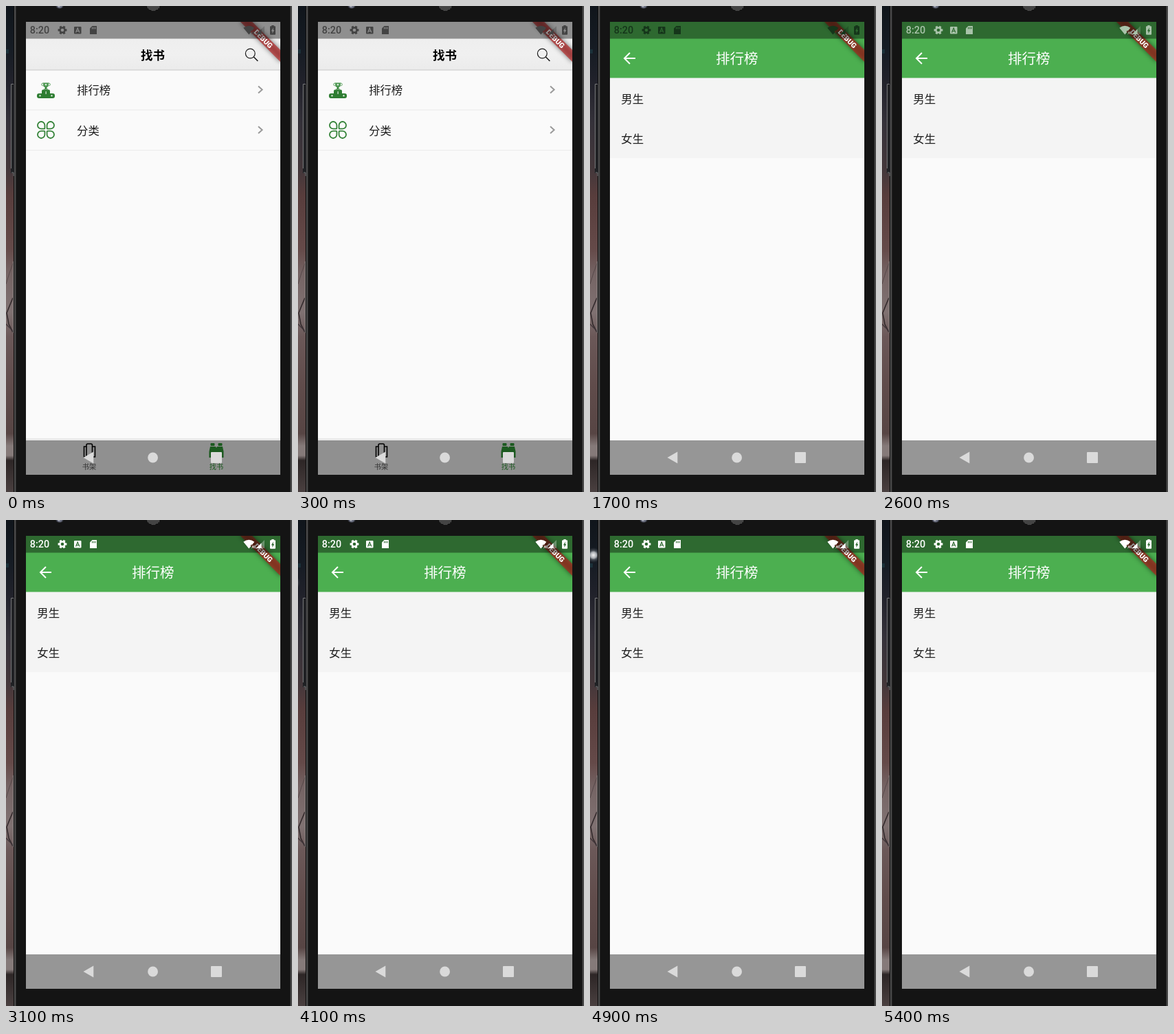
Recreate the animation shown at these times as an HTML page with a canvas. Size 416 by 706 pixels, loop 8 s.

```html
<!DOCTYPE html>
<html lang="zh-CN">
<head>
<meta charset="utf-8">
<style>
html, body { margin: 0; width: 100%; height: 100%; overflow: hidden; background: #141414; }
canvas { display: block; width: 416px; height: 706px; }
</style>
</head>
<body>
<canvas id="stage"></canvas>
<script>
const W = 416, H = 706, LOOP = 8000, TAU = Math.PI * 2;
const SCREEN = { x: 29, y: 23, w: 370, h: 658 };
const CJK = '"Noto Sans CJK SC", "Noto Sans CJK", sans-serif';
const ROBOTO = 'Roboto, sans-serif';
const canvas = document.getElementById('stage');
const dpr = window.devicePixelRatio || 1;
canvas.width = W * dpr;
canvas.height = H * dpr;
const c = canvas.getContext('2d');

function rect(x, y, w, h, fill) {
  c.fillStyle = fill;
  c.fillRect(x, y, w, h);
}
function round(x, y, w, h, r, fill) {
  c.beginPath();
  c.roundRect(x, y, w, h, r);
  c.fillStyle = fill;
  c.fill();
}
function disc(x, y, r, fill) {
  c.beginPath();
  c.arc(x, y, r, 0, TAU);
  c.fillStyle = fill;
  c.fill();
}
function poly(points, fill) {
  c.beginPath();
  points.forEach(([x, y]) => c.lineTo(x, y));
  c.closePath();
  c.fillStyle = fill;
  c.fill();
}
function line(points, color, width) {
  c.beginPath();
  points.forEach(([x, y]) => c.lineTo(x, y));
  c.strokeStyle = color;
  c.lineWidth = width;
  c.stroke();
}
function gradient(y0, y1, stops) {
  const g = c.createLinearGradient(0, y0, 0, y1);
  stops.forEach(([at, color]) => g.addColorStop(at, color));
  return g;
}
// Han text centred vertically on y
function han(text, x, y, size, fill, align = 'left', weight = 400) {
  c.font = `${weight} ${size}px ${CJK}`;
  c.textAlign = align;
  c.fillStyle = fill;
  c.fillText(text, x, y + size * 0.38);
}

function wallpaper(t) {
  rect(0, 0, 16, H, gradient(0, H, [
    [0, '#10151b'], [0.09, '#161c24'], [0.15, '#20212a'], [0.24, '#35323a'],
    [0.34, '#45383b'], [0.39, '#583d3c'], [0.5, '#654a49'], [0.55, '#756464'],
    [0.63, '#807272'], [0.68, '#6b5858'], [0.78, '#604c4b'], [0.88, '#574544'],
    [0.905, '#857a79'], [0.925, '#857a79'], [0.935, '#2d2626'], [1, '#4a4040']
  ]));
  rect(0, 63, 4, 6, 'rgba(30,62,72,.6)');
  line([[10, 424], [5, 436], [1, 446], [4, 462], [10, 474]], '#332a2c', 1.6);
  line([[0, 462], [6, 468], [11, 473]], '#40363a', 1.4);
  line([[0, 404], [5, 388], [10, 374]], '#57494a', 1);
  if (t >= 4100 && t < 5400) {
    const k = Math.floor((t - 4900) / 100);
    const x = 5 + 1.6 * k, y = 51 - 5 * k;
    const g = c.createRadialGradient(x, y, 1, x, y, 11);
    g.addColorStop(0, 'rgba(240,240,240,.95)');
    g.addColorStop(0.35, 'rgba(205,208,212,.8)');
    g.addColorStop(0.6, 'rgba(130,135,142,.4)');
    g.addColorStop(1, 'rgba(90,95,105,0)');
    rect(0, y - 11, 12, 22, g);
  }
}

function phone() {
  rect(11, 0, 405, H, '#141414');
  rect(11, 0, 1, H, '#0d0d0d');
  rect(12, 0, 2, H, '#4b4b4b');
  rect(14, 0, 1, H, '#2a2a2a');
  rect(413, 0, 1, H, '#2a2a2a');
  rect(414, 0, 2, H, '#4b4b4b');
  round(7, 113, 5, 130, 1, '#202124');
  line([[11, 113.5], [7.5, 113.5], [7.5, 236]], '#77787a', 1);
  line([[8, 242], [11, 242], [11, 247]], '#77787a', 1);
  rect(10, 371, 1, 104, '#8a8382');
  disc(78, -2, 6, '#34363f');
  disc(78, -1, 4, '#6d7182');
  disc(77, 0, 1.6, '#b1b3bc');
  disc(214, -3, 10, '#333');
  for (let y = 0; y < 7; y += 2)
    for (let x = -8; x <= 8; x += 2)
      if (x * x + (y + 3) ** 2 < 90) rect(214 + x, y, 1, 1, '#777');
}

function podium() {
  const green = '#2e7d32';
  round(45, 127, 26, 7, 3, green);
  round(52, 121.5, 12, 12, 2, green);
  poly([[53.5, 111.5], [62.5, 111.5], [61.5, 116.5], [59, 119], [57, 119], [54.5, 116.5]], '#4b9650');
  c.strokeStyle = '#66a86a';
  c.lineWidth = 1;
  for (const x of [53.5, 62.5]) {
    c.beginPath();
    c.arc(x, 114, 1.8, 0, TAU);
    c.stroke();
  }
  rect(57, 118, 2, 3, green);
  rect(55, 120.3, 6, 1, green);
  disc(58, 114.3, 1.2, '#e4f1e5');
  rect(57.6, 124, 1, 4, '#fff');
  rect(48.5, 129, 2, 2.5, '#d5e7d6');
  rect(65.5, 129, 2, 2.5, '#d5e7d6');
}

function clover() {
  c.strokeStyle = '#358339';
  c.lineWidth = 1.8;
  for (let i = 0; i < 4; i++) {
    c.save();
    c.translate(58, 180);
    c.rotate(i * TAU / 4);
    c.beginPath();
    c.roundRect(1.6, 1.6, 10.4, 10.4, [1, 5.2, 5.2, 5.2]);
    c.stroke();
    c.restore();
  }
}

function tabIcons() {
  const green = '#2f9535';
  c.strokeStyle = '#000';
  c.lineWidth = 1.6;
  c.beginPath();
  c.roundRect(117, 636, 8.5, 19, 2);
  c.moveTo(117, 640);
  c.lineTo(113.5, 640);
  c.lineTo(113.5, 655);
  c.lineTo(129.5, 655);
  c.lineTo(129.5, 640);
  c.lineTo(125.5, 640);
  c.stroke();
  for (const s of [-1, 1]) {
    c.save();
    c.translate(306, 0);
    c.scale(s, 1);
    round(2.5, 635, 6, 4, 1, green);
    poly([[1, 640], [9, 640], [10.5, 647], [10.5, 656], [2, 656], [2, 650], [0, 650], [0, 642]], green);
    c.restore();
  }
}

function findPage() {
  rect(29, 23, 370, 658, '#fafafa');
  rect(29, 23, 370, 70, gradient(47, 93, [[0, '#eeeeee'], [0.5, '#f0f0f0'], [1, '#ebebeb']]));
  rect(29, 92.5, 370, 1, '#c9c9c9');
  han('找书', 213.5, 71, 17.5, '#000', 'center', 700);
  c.strokeStyle = '#1a1a1a';
  c.lineWidth = 1.2;
  c.beginPath();
  c.arc(355.3, 69, 6.9, 0, TAU);
  c.stroke();
  line([[360.3, 74], [366.3, 80]], '#1a1a1a', 1.6);
  podium();
  clover();
  [['排行榜', 122, 150.5], ['分类', 180.5, 209]].forEach(([text, y, edge]) => {
    han(text, 103, y, 16.4, '#1c1c1c');
    line([[367, y - 5.5], [372.6, y - 0.5], [367, y + 4.5]], '#9a9a9a', 2);
    rect(29, edge, 370, 1, '#ebebeb');
  });
  rect(29, 629, 370, 52, '#efefef');
  rect(29, 628.5, 370, 1, '#dcdcdc');
  tabIcons();
  han('书架', 121, 669.5, 10.2, '#555', 'center');
  han('找书', 306, 669.5, 10.2, '#2f9535', 'center');
}

function rankPage() {
  rect(29, 23, 370, 658, '#fafafa');
  rect(29, 104, 370, 117, '#f4f4f4');
  rect(29, 23, 370, 81.5, '#4caf50');
  line([[66, 76], [50.5, 76]], '#fff', 2);
  line([[58, 68], [50, 76], [58, 84]], '#fff', 2);
  han('排行榜', 213.7, 76.5, 20.5, '#fff', 'center');
  han('男生', 45.3, 135, 16.4, '#1f1f1f');
  han('女生', 45.3, 192.5, 16.4, '#1f1f1f');
}

function ribbon() {
  c.save();
  c.translate(399, 23);
  c.rotate(Math.PI / 4);
  c.filter = `blur(${3.5 * dpr}px)`;
  rect(-41, 28.8, 82, 12.3, 'rgba(0,0,0,.5)');
  c.filter = 'none';
  rect(-41, 28.8, 82, 12.3, 'rgba(183,28,28,.63)');
  c.font = `900 10.4px ${ROBOTO}`;
  c.textAlign = 'center';
  c.fillStyle = '#fff';
  c.fillText('DEBUG', 0, 38.7);
  c.restore();
}

function gear(x, y, ink) {
  c.beginPath();
  for (let i = 0; i < 6; i++) {
    const a = i * TAU / 6 + TAU / 12 + TAU / 6 * 0.5;
    for (const [d, r] of [[-0.36, 4.7], [-0.24, 6.6], [0.24, 6.6], [0.36, 4.7]])
      c.lineTo(x + Math.cos(a + d) * r, y + Math.sin(a + d) * r);
  }
  c.closePath();
  c.moveTo(x + 2.3, y);
  c.arc(x, y, 2.3, 0, TAU);
  c.fillStyle = ink;
  c.fill('evenodd');
}

function statusBar(ink, bg) {
  c.font = `500 14.4px ${ROBOTO}`;
  c.textAlign = 'left';
  c.fillStyle = ink;
  c.fillText('8:20', 34.8, 40.3);
  gear(82, 35, ink);
  round(99, 30, 10.5, 10.5, 1, ink);
  line([[101.6, 38.4], [104.2, 32], [106.9, 38.4]], bg, 1.2);
  line([[102.5, 36.5], [106, 36.5]], bg, 1);
  poly([[125.5, 29], [132, 29], [132, 41], [122, 41], [122, 32.5]], ink);
  for (const x of [125, 127.2, 129.4]) rect(x, 30.8, 1.1, 2.6, bg);
  // wifi fan, signal wedge, battery
  c.beginPath();
  c.moveTo(353.3, 41.5);
  c.lineTo(345.3, 31.8);
  c.quadraticCurveTo(353.3, 25.8, 361.3, 31.8);
  c.lineTo(358, 36);
  c.lineTo(356, 36);
  c.lineTo(356, 38.5);
  c.closePath();
  c.fillStyle = ink;
  c.fill();
  line([[357.5, 37], [361.2, 41]], ink, 1);
  line([[361.2, 37], [357.5, 41]], ink, 1);
  c.save();
  c.globalAlpha = 0.3;
  poly([[376, 29], [376, 41], [364, 41]], ink);
  c.restore();
  poly([[371.5, 33.5], [371.5, 41], [364, 41]], ink);
  round(384, 29.3, 8, 12.4, 1, ink);
  rect(386.3, 28, 3.4, 2, ink);
  poly([[388.8, 31.5], [385.9, 36.4], [387.6, 36.4], [387.3, 40], [390.2, 35], [388.6, 35]], bg);
}

function navButtons() {
  const ink = '#dadada';
  poly([[112.5, 656], [127.3, 647.5], [127.3, 664.5]], ink);
  disc(213.6, 656, 7.4, ink);
  round(298, 648, 16, 16, 1, ink);
}

function draw(t) {
  c.setTransform(dpr, 0, 0, dpr, 0, 0);
  c.lineJoin = 'miter';
  c.lineCap = 'butt';
  wallpaper(t);
  phone();
  const ranking = t >= 1700;
  c.save();
  c.beginPath();
  c.rect(SCREEN.x, SCREEN.y, SCREEN.w, SCREEN.h);
  c.clip();
  ranking ? rankPage() : findPage();
  ribbon();
  rect(29, 23, 370, 24.5, 'rgba(0,0,0,.4)');
  rect(29, 631, 370, 50, 'rgba(0,0,0,.4)');
  const ink = t < 1700 ? '#434343' : t < 2600 ? '#15351a' : t < 3100 ? '#a9c3aa' : '#fff';
  statusBar(ink, ranking ? '#2e6930' : '#8f8f8f');
  navButtons();
  c.restore();
}

function tick(now) {
  draw(now % LOOP);
  requestAnimationFrame(tick);
}
draw(0);
requestAnimationFrame(tick);
</script>
</body>
</html>
```
